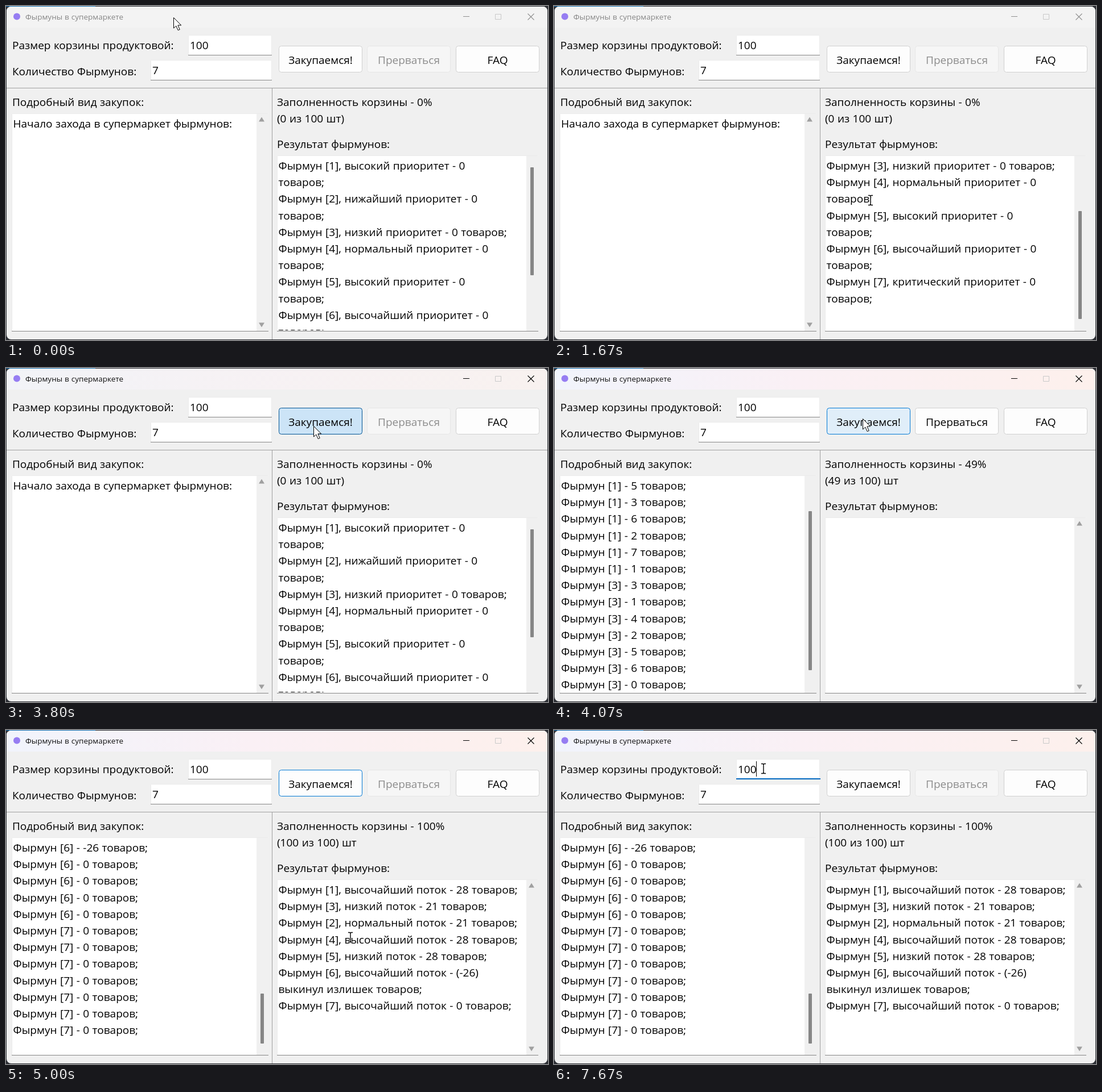
Write an HTML page that moves like this. It is 952 px wide and 588 px high and loops after 8 s.

```html
<!DOCTYPE html>
<html lang="ru">
<head>
<meta charset="utf-8">
<title>Фырмуны в супермаркете</title>
<style>
html, body { margin: 0; width: 100%; height: 100%; overflow: hidden; background: #2b2d33; }
svg { display: block; width: 952px; height: 588px; }
text { font: 19px "Open Sans", "Noto Sans", sans-serif; word-spacing: .5px; fill: #000; }
.title { font-size: 13.5px; }
.mid { text-anchor: middle; }
</style>
</head>
<body>
<svg id="stage" viewBox="0 0 952 588">
  <defs>
    <clipPath id="win"><rect x="1" y="1" width="950" height="586" rx="8"/></clipPath>
    <clipPath id="leftView"><rect x="11" y="190" width="429" height="381"/></clipPath>
    <clipPath id="rightView"><rect x="477" y="264" width="437" height="307"/></clipPath>
    <linearGradient id="mica">
      <stop offset="0" stop-color="#f1f4fc"/>
      <stop offset=".45" stop-color="#faf0f5"/>
      <stop offset="1" stop-color="#fdf0ec"/>
    </linearGradient>
  </defs>
  <g id="scene"></g>
</svg>
<script>
const LOOP = 8000, TICK = 1000 / 15, LINE = 29.2;
const scene = document.getElementById('scene');

// Tick numbers at which the state changes
const T = { scroll: 25, unscroll: 30, press: 57, run: 58, done: 67, focus: 112 };

// Pointer path: tick, x, y
const path = [
  [1, 294, 20], [5, 390, 75], [9, 490, 115], [11, 530, 108], [13, 521, 97], [14, 521, 97],
  [15, 521, 98], [20, 521, 98], [24, 556, 342], [33, 556, 342], [34, 520, 95], [35, 457, 40],
  [36, 462, 17], [43, 462, 17], [49, 540, 102], [58, 540, 102], [62, 543, 85], [64, 544, 66],
  [65, 545, 58], [69, 545, 63], [73, 580, 320], [75, 605, 365], [77, 623, 284], [78, 623, 284],
  [83, 697, 376], [84, 697, 376], [86, 696, 354], [87, 696, 354], [93, 617, 288],
  [96, 460, 190], [98, 253, 110], [100, 282, 66], [109, 368, 68]
];

const NAME = 'Фырмун';
const START = 'Начало захода в супермаркет фырмунов:';
const levels = ['высокий', 'нижайший', 'низкий', 'нормальный', 'высокий', 'высочайший', 'критический'];
const before = levels.flatMap((level, i) => {
  const head = `${NAME} [${i + 1}], ${level} приоритет - 0`;
  return level === 'низкий' ? [head + ' товаров;'] : [head, 'товаров;'];
});
const results = [
  [1, 'высочайший', '28 товаров;'], [3, 'низкий', '21 товаров;'],
  [2, 'нормальный', '21 товаров;'], [4, 'высочайший', '28 товаров;'],
  [5, 'низкий', '28 товаров;'], [6, 'высочайший', '(-26)'], [7, 'высочайший', '0 товаров;']
].map(([id, level, sum]) => `${NAME} [${id}], ${level} поток - ${sum}`);
results.splice(6, 0, 'выкинул излишек товаров;');

const order = [1, 3, 2, 4, 5, 6, 7];
const takes = ['4536271', '3142560', '5213406', '6172534', '1315747']
  .flatMap(s => [...s].map(Number))
  .concat(Array.from({ length: 14 }, (_, i) => i === 2 ? -26 : 0));
const log = [START, ...takes.map((n, i) => `${NAME} [${order[Math.floor(i / 7)]}] - ${n} товаров;`)];

const clamp = v => Math.max(0, Math.min(1, v));
const inside = ([px, py], x, y, w, h) => px >= x && px < x + w && py >= y && py < y + h;
const rect = (x, y, w, h, fill, more = '') =>
  `<rect x="${x}" y="${y}" width="${w}" height="${h}" fill="${fill}" ${more}/>`;
const text = (x, y, s, more = '') => `<text x="${x}" y="${y}" ${more}>${s}</text>`;
const stroke = (d, color, width = 1) =>
  `<path d="${d}" fill="none" stroke="${color}" stroke-width="${width}"/>`;

function mix(a, b, p) {
  const part = (c, i) => parseInt(c.substr(1 + 2 * i, 2), 16);
  return `rgb(${[0, 1, 2].map(i => Math.round(part(a, i) + (part(b, i) - part(a, i)) * p))})`;
}

function pointer(k) {
  if (k <= path[0][0]) return path[0].slice(1);
  for (let i = 1; i < path.length; i++) {
    const [k0, x0, y0] = path[i - 1], [k1, x1, y1] = path[i];
    if (k <= k1) {
      const p = (k - k0) / (k1 - k0);
      return [Math.round(x0 + (x1 - x0) * p), Math.round(y0 + (y1 - y0) * p)];
    }
  }
  return path[path.length - 1].slice(1);
}

// Hover colour fades over four ticks
function hover(k) {
  let sum = 0;
  for (let i = 0; i < 4; i++) sum += inside(pointer(k - i), 479, 70, 147, 47);
  return sum / 4;
}

function titleBar(active, glow) {
  const ink = active ? '#000' : '#8f8f8f';
  return rect(1, 1, 950, 37, '#f3f3f3') +
    rect(1, 1, 950, 37, 'url(#mica)', `opacity="${glow}"`) +
    '<circle cx="19" cy="18.5" r="6" fill="#967df2"/>' +
    text(34, 24, 'Фырмуны в супермаркете', `class="title" style="fill:${active ? '#111' : '#868686'}"`) +
    stroke('M803 18.5h11', ink) +
    stroke('M859.5 14.5h10v9h-10z', '#c9c9c9') +
    stroke('M916.5 13.5l11 11m0 -11l-11 11', ink, 1.1);
}

function field(x, y, value, focus) {
  const w = 467 - x;
  return rect(x, y, w, 36, '#fff') +
    stroke(`M${x + .5} ${y + 35}v-34.5h${w - 1}v34.5`, '#ebebeb') +
    (focus ? rect(x, y + 34, w + 1, 2, '#0067c0') : rect(x, y + 35, w, 1, '#868686')) +
    text(x + 3, y + 25, value) +
    (focus ? rect(355, y + 4, 1, 27, '#000') : '');
}

function button(x, label, fill, edge, ink = '#000') {
  return rect(x + .5, 70.5, 146, 46, fill, `rx="4" stroke="${edge}"`) +
    text(x + 73.5, 101.5, label, `class="mid" style="fill:${ink}"`);
}

function list(x, y, w, lines, scroll, clip, bar) {
  const h = 573 - y, barX = x + w - 21, mid = barX + 9;
  const rows = lines.map((s, i) => [s, y + 25 + (i - scroll) * LINE])
    .filter(([, ty]) => ty > y - 10 && ty < 600)
    .map(([s, ty]) => text(x + 2.5, ty.toFixed(1), s)).join('');
  const side = bar
    ? rect(barX + 7, Math.round(bar[0]), 6, Math.round(bar[1]), '#868686', 'rx="1"')
    : `<path d="M${mid - 5} ${y + 14.5}h10l-5 -8zM${mid - 5} 557.5h10l-5 8z" fill="#a0a0a0"/>`;
  return rect(x, y, w, h, '#fff') +
    rect(barX, y + 1, 21, h - 2, '#f0f0f0') +
    stroke(`M${x + .5} 572v-${h - 1.5}h${w - 1}`, '#ebebeb') +
    `<g clip-path="url(#${clip})">${rows}</g>` + side +
    rect(x, 572, w, 1, '#868686');
}

function cursor(k) {
  const p = pointer(k), [x, y] = p;
  const typing = inside(p, 320, 51, 147, 36) || inside(p, 254, 95, 213, 36) ||
    inside(p, 10, 189, 430, 383) || inside(p, 476, 263, 438, 309);
  const at = `transform="translate(${x} ${y})"`;
  if (typing) {
    const d = 'M-4 -8.5h2.5q1.5 0 1.5 1.5v14q0 1.5 -1.5 1.5h-2.5M4 -8.5h-2.5q-1.5 0 -1.5 1.5M0 7q0 1.5 1.5 1.5h2.5';
    return `<g ${at}>${stroke(d, '#fff', 3)}${stroke(d, '#000', 1.4)}</g>`;
  }
  return `<path ${at} d="M.5 .5v18.5l4.3 -4 3.4 7.7 3 -1.3 -3.3 -7.5h5.8z" fill="#fff" stroke="#000" stroke-linejoin="round"/>`;
}

function buyButton(k) {
  const p = hover(k), focused = k >= T.press && k < T.focus;
  if (k === T.press) return button(479, 'Закупаемся!', '#cce4f7', '#005494');
  return button(479, 'Закупаемся!', mix('#fdfdfd', '#e0eef9', p),
    mix(focused ? '#0078d4' : '#d0d0d0', '#0078d4', p));
}

function draw(k) {
  const started = k >= T.run, done = k >= T.done, busy = started && !done;
  const groups = started ? Math.max(0, Math.min(7, k - 59)) : 0;
  const count = 1 + groups * 7;
  const taken = takes.slice(0, groups * 7).reduce((a, b) => a + b, 0);
  const fill = Math.min(100, taken);

  const total = count + 1;
  const top = Math.max(0, count - (done ? 12 : 13));
  const leftBar = count > 13 && [209 + 342 * top / total, 342 * 13.1 / total];
  const scrolled = k >= T.scroll && k < T.unscroll;
  const rightLines = done ? results : started ? [] : before;

  scene.innerHTML =
    rect(0, 0, 952, 588, '#2b2d33') + rect(0, 0, 157, 1, '#1673b5') +
    '<g clip-path="url(#win)">' +
    rect(1, 1, 950, 586, '#f0f0f0') +
    titleBar(k >= T.press, clamp((k - T.press + 2) / 4) * (k >= T.press)) +
    rect(1, 144, 950, 1, '#a0a0a0') + rect(467, 145, 1, 442, '#a0a0a0') +
    text(11, 76, 'Размер корзины продуктовой:') +
    text(11, 121.5, 'Количество Фырмунов:') +
    field(320, 51, '100', k >= T.focus) + field(254, 95, '7') +
    buyButton(k) +
    (busy ? button(634, 'Прерваться', '#fdfdfd', '#d0d0d0')
      : button(634, 'Прерваться', '#f6f6f6', '#e6e6e6', '#8c8c8c')) +
    button(790, 'FAQ', '#fdfdfd', '#d0d0d0') +
    text(11, 176, 'Подробный вид закупок:') +
    text(476, 176, `Заполненность корзины - ${fill}%`) +
    text(476, 205, started ? `(${fill} из 100) шт` : '(0 из 100 шт)') +
    text(476, 250, 'Результат фырмунов:') +
    list(10, 189, 451, log.slice(0, count), top, 'leftView', leftBar) +
    list(476, 263, 459, rightLines, scrolled ? 4 : 0, 'rightView',
      !started && [scrolled ? 361 : 284, 190]) +
    '</g>' + cursor(k);
}

let last = -1;
function frame(now) {
  const k = Math.floor((now % LOOP + 5) / TICK) % 120;
  if (k !== last) draw(last = k);
  requestAnimationFrame(frame);
}
draw(0);
requestAnimationFrame(frame);
</script>
</body>
</html>
```
